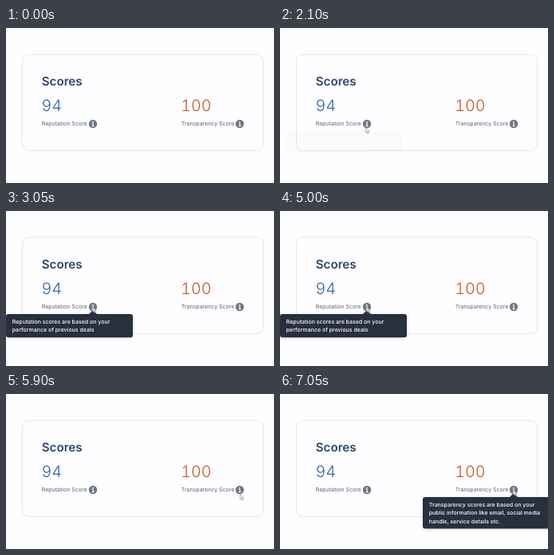
These frames come from a looping animation (336x194 px, 8 s). An HTML page:

```html
<!DOCTYPE html>
<html lang="en">
<head>
<meta charset="utf-8">
<title>Scores</title>
<style>
  html, body { margin: 0; width: 100%; height: 100%; overflow: hidden; background: #fefdff; }
  svg { display: block; width: 100%; height: 100%; font-family: Inter, "Liberation Sans", sans-serif; }
  text { text-rendering: geometricPrecision; }
  .title { font-size: 15.2px; font-weight: 600; fill: #2c4870; }
  .value { font-size: 19.8px; font-weight: 300; font-variant-numeric: tabular-nums; }
  .label { font-size: 7px; fill: #586271; }
  .tip { opacity: 0; }
  .tip text { font-size: 7px; font-weight: 500; fill: #fff; }
  .tip rect, .tip path { fill: #282f3d; }
  .tip rect { filter: drop-shadow(0 1px 2px rgba(0, 0, 0, .14)); }
  #tip1 { transform-origin: 83px 129px; }
  #tip2 { transform-origin: 262px 129px; }
</style>
</head>
<body>
<svg viewBox="0 0 336 194">
  <defs>
    <g id="info">
      <circle r="5.2" fill="#6b7788"/>
      <circle cx="-.1" cy="-2.5" r=".85" fill="#fff"/>
      <path d="M-1.2 -.7H.2V2.5M-1.4 2.6H1.5" fill="none" stroke="#fff" stroke-width="1.1"/>
    </g>
  </defs>

  <rect x="20.5" y="33" width="302" height="120.5" rx="8" fill="none" stroke="#e5e7f2"/>
  <text class="title" x="44.7" y="71.8">Scores</text>

  <text class="value" x="44.4" y="104.2" fill="#2f66a8">94</text>
  <text class="label" x="44.8" y="122.4">Reputation Score</text>
  <use href="#info" x="109" y="120"/>

  <text class="value" x="219.2" y="104.2" fill="#c05a21">100</text>
  <text class="label" x="219.8" y="122.4">Transparency Score</text>
  <use href="#info" x="293" y="120"/>

  <g id="tip1" class="tip">
    <rect y="129" width="159" height="29.2" rx="3"/>
    <path d="M103.5 129.5L109 124L114.5 129.5Z"/>
    <text x="7.8" y="141">Reputation scores are based on your</text>
    <text x="7.8" y="151.3">performance of previous deals</text>
  </g>

  <g id="tip2" class="tip">
    <rect x="179" y="129" width="159" height="39.6" rx="3"/>
    <path d="M287.5 129.5L293 124L298.5 129.5Z"/>
    <text x="186.8" y="141">Transparency scores are based on your</text>
    <text x="186.8" y="151.3">public information like email, social media</text>
    <text x="186.8" y="161.6">handle, service details etc.</text>
  </g>

  <path id="cursor" d="M0 0V6.4L1.5 5.1L2.6 7.5L3.5 7.1L2.5 4.8H4.5Z"
        fill="#fff" stroke="#66666c" stroke-width=".55" stroke-linejoin="round"/>
</svg>
<script>
  const LOOP = 8000;

  function play(id, frames) {
    document.getElementById(id).animate(frames, { duration: LOOP, iterations: Infinity });
  }

  // time, x, y, easing towards the next stop
  const path = [
    [0, 122, 198],
    [600, 122, 198, "ease-in"],
    [800, 119, 186.5],
    [850, 118, 176, "ease-out"],
    [1750, 108, 130],
    [2050, 107.6, 124.6, "ease-in-out"],
    [2600, 108.6, 120.2],
    [5000, 108.6, 120.2, "ease-in-out"],
    [5450, 296, 132],
    [5600, 295.5, 131, "ease-in-out"],
    [5900, 293.5, 125.4, "ease-in-out"],
    [6300, 292.4, 120.2],
    [LOOP, 292.4, 120.2]
  ];
  play("cursor", path.map(([t, x, y, easing = "linear"]) => ({
    offset: t / LOOP, transform: `translate(${x}px, ${y}px)`, easing
  })));

  // time, opacity, scale
  function playTip(id, steps) {
    play(id, steps.map(([t, opacity, scale]) => ({
      offset: t / LOOP, opacity, transform: `scale(${scale})`, easing: "ease-in-out"
    })));
  }
  playTip("tip1", [
    [0, 0, .915], [2083, 0, .915], [2280, 1, 1],
    [5050, 1, 1], [5200, 0, .915], [LOOP, 0, .915]
  ]);
  playTip("tip2", [
    [0, 0, .915], [5960, 0, .915], [6160, 1, 1], [LOOP, 1, 1]
  ]);
</script>
</body>
</html>
```
